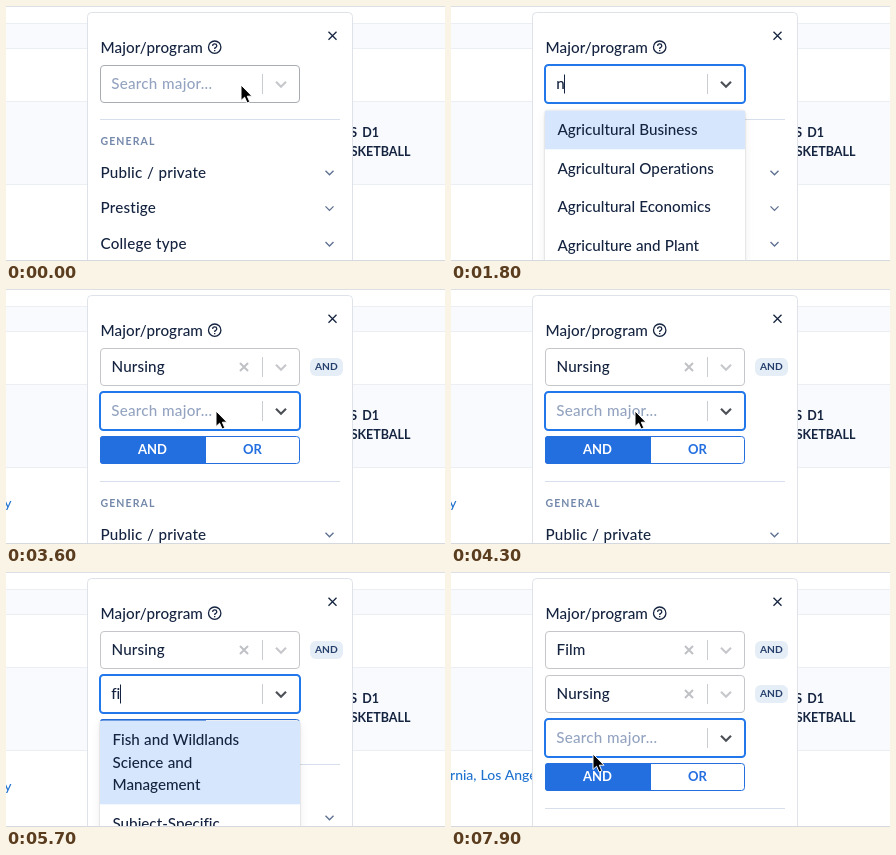
An HTML page that plays this animation: 439x255 px, repeating every 8000 ms.

```html
<!DOCTYPE html>
<html lang="en">
<head>
<meta charset="utf-8">
<title>Major search</title>
<style>
  html, body { margin: 0; width: 100%; height: 100%; overflow: hidden; background: #fff; }
  svg { display: block; width: 439px; height: 255px; }
  text { font: 500 15.2px Lato, sans-serif; font-variant-ligatures: none; word-spacing: .4px; fill: #14233f; white-space: pre; }
  .hint { fill: #93a3c0; letter-spacing: .25px; }
  .heading { font-size: 10.5px; font-weight: 700; letter-spacing: 1.1px; fill: #7388aa; }
  .sport { font-size: 12.5px; font-weight: 700; text-anchor: end; word-spacing: 2px; }
  .link { font-size: 14px; fill: #1f72d0; }
  .badge { font-size: 10.2px; font-weight: 700; text-anchor: middle; fill: #243f6b; }
  .button { font-size: 13px; font-weight: 700; text-anchor: middle; }
</style>
</head>
<body>
<svg id="stage" viewBox="0 0 439 255"></svg>
<script>
const LOOP = 8000, STEP = 100;
const BLUE = '#246fe0', FOCUS = '#2277ea', RULE = '#d8dfec';
const stage = document.getElementById('stage');

const agriculture = [['Agricultural Business'], ['Agricultural Operations'],
  ['Agricultural Economics'], ['Agriculture and Plant', 'Operations']];
const nursing = [['Nursing'], ['Nursing Science'], ['Nursing Practice'], ['Nursing Education']];
const fish = [['Fish and Wildlands', 'Science and', 'Management'], ['Subject-Specific', 'Education']];
const film = [['Film'], ['Film and Video'], ['Film Studies']];

// start time, typed text, options (null while the menu is closed)
const searches = [
  [0, '', null], [600, '', agriculture], [1700, 'n', agriculture], [2000, 'nu', nursing],
  [2100, 'nur', nursing], [3400, '', null], [4600, '', agriculture], [5500, 'f', fish],
  [5700, 'fi', fish], [5800, 'fil', film], [5900, 'film', film], [6600, '', null]
];
const caretOn = [[600, 1100], [1600, 2500], [3000, 3400], [5000, 6400]];
const pointerOn = [[0, 1700], [2700, 5500], [7600, LOOP]];
const pointerPath = [
  [0, 235, 79], [200, 209, 78], [2600, 209, 78], [3200, 210, 122], [4100, 210, 122],
  [4300, 184, 122], [7500, 184, 122], [7900, 142, 182], [LOOP, 142, 182]
];

const within = (t, spans) => spans.some(([from, to]) => t >= from && t < to);

function pointerAt(t) {
  const i = pointerPath.findIndex(p => p[0] > t);
  const [t0, x0, y0] = pointerPath[i - 1], [t1, x1, y1] = pointerPath[i];
  const k = (t - t0) / (t1 - t0), ease = k * k * (3 - 2 * k);
  return [x0 + (x1 - x0) * ease, y0 + (y1 - y0) * ease];
}

const text = (x, y, s, cls = '', extra = '') =>
  `<text x="${x}" y="${y}" class="${cls}" ${extra}>${s}</text>`;
const rect = (x, y, w, h, fill, extra = '') =>
  `<rect x="${x}" y="${y}" width="${w}" height="${h}" fill="${fill}" ${extra}/>`;
const path = (d, color, width = 1) =>
  `<path d="${d}" fill="none" stroke="${color}" stroke-width="${width}"/>`;
const cross = (x, y, r, color, width) =>
  path(`M${x - r} ${y - r}l${2 * r} ${2 * r}m0 ${-2 * r}l${-2 * r} ${2 * r}`, color, width);
const chevron = (x, y, r, color, width) =>
  path(`M${x - r} ${y - r / 2}l${r} ${r}l${r} ${-r}`, color, width);

function page(t) {
  const link = t < 3500 ? '' : t < 6600
    ? text(5.5, 219, 'University', 'link', 'text-anchor="end"')
    : text(-1, 207.5, 'rnia, Los Angeles', 'link');
  return rect(0, 0, 439, 255, '#fff') +
    rect(0, 17, 439, 26, '#f8fafd') + rect(0, 95, 439, 84, '#f8fafd') +
    path('M0 .5H439', '#dcdfe3') + path('M0 17.5H439M0 42.5H439M0 95.5H439M0 178.5H439', '#ebeff4') +
    text(373, 131, "MEN'S D1", 'sport') + text(404.5, 150, 'BASKETBALL', 'sport') + link;
}

function panel(shift) {
  const items = ['Public / private', 'Prestige', 'College type'].map((label, i) => {
    const y = 166.5 + 35.6 * i + shift;
    return text(94.5, y + 5, label, '', 'letter-spacing=".2"') +
      chevron(323.5, y + .3, 4, '#5c6f92', 1.3);
  });
  return rect(81.5, 6.5, 265, 260, '#fff', 'rx="4" stroke="#dfe3e9"') +
    cross(326.5, 29.8, 4, '#14233f', 1.3) +
    text(94.5, 46.5, 'Major/program', '', 'letter-spacing=".1"') +
    '<circle cx="208.7" cy="41.2" r="6.2" fill="none" stroke="#14233f" stroke-width="1.3"/>' +
    path('M206.6 39.9q.1-2 2.1-2t2.1 1.8q0 1.1-1.1 1.7-1 .5-1 1.5M208.7 43.9v1.3', '#14233f', 1.3) +
    path(`M94 ${113.5 + shift}H334`, RULE) +
    text(94.5, 139 + shift, 'GENERAL', 'heading') + items.join('');
}

function control(y, focused, hovered) {
  const border = focused ? FOCUS : hovered ? '#a9adb3' : '#c4c6c9';
  const frame = focused
    ? rect(94, y - 1, 200, 38, '#fff', `rx="3.5" stroke="${border}" stroke-width="2"`)
    : rect(94.5, y - .5, 199, 37, '#fff', `rx="3.5" stroke="${border}"`);
  return frame + path(`M256.5 ${y + 8}v20`, '#c9ccd1') +
    chevron(275, y + 18.2, 5, focused ? '#4d5157' : '#c6c8cc', 2.2);
}

const chosen = (y, label, hovered) => control(y, false, hovered) +
  text(105.5, y + 23, label, '', 'letter-spacing=".15"') + cross(238, y + 18, 4, '#bfc1c5', 2) +
  rect(304, y + 9, 33, 18, '#e5edf6', 'rx="6"') + text(320.3, y + 21.3, 'AND', 'badge');

const buttons = y =>
  rect(94.5, y + .5, 199, 27, '#fff', `rx="3" stroke="${BLUE}"`) +
  `<path d="M200 ${y}v28H97q-3 0-3-3v-22q0-3 3-3z" fill="${BLUE}"/>` +
  text(146.5, y + 18.3, 'AND', 'button', 'style="fill:#fff"') +
  text(246.5, y + 18.3, 'OR', 'button', `style="fill:${BLUE}"`);

function menu(top, options) {
  let y = top;
  const rows = options.map((lines, i) => {
    const height = 16 + 22.5 * lines.length;
    const row = (i ? '' : rect(94, y, 200, height, '#d6e6fd')) +
      lines.map((line, j) => text(106.5, y + 24.5 + 22.5 * j, line)).join('');
    y += height;
    return row;
  });
  return rect(94, top, 200, y - top, '#fff',
    'rx="3" style="filter:drop-shadow(0 0 1px #0003) drop-shadow(0 3px 4px #0001)"') + rows.join('');
}

const pointer = ([x, y]) => `<path transform="translate(${x} ${y})"
  d="M0 0V15.5L3.6 12.2 6.1 18 8.8 16.8 6.3 11.2H11Z" fill="#000" stroke="#fff"/>`;

function render(t) {
  const picks = t < 3400 ? [] : t < 6600 ? ['Nursing'] : ['Film', 'Nursing'];
  const n = picks.length, y = 60 + 44 * n;
  const [, typed, options] = searches.filter(s => s[0] <= t).pop();
  const mouse = pointerAt(t);
  const hovered = top => mouse[1] >= top && mouse[1] <= top + 37;

  stage.innerHTML = page(t) + panel(n ? 35 + 44 * n : 0) +
    picks.map((label, i) => chosen(60 + 44 * i, label, hovered(60 + 44 * i))).join('') +
    control(y, t >= 600, hovered(y)) +
    text(105.2, y + 23, typed || 'Search major...', typed ? '' : 'hint', 'id="query"') +
    (n ? buttons(y + 43) : '') +
    (options ? menu(y + 44.8, options) : '') +
    path('M0 254.5H439', '#d5d8dc');

  if (within(t, caretOn)) {
    const width = typed ? document.getElementById('query').getComputedTextLength() : 0;
    stage.insertAdjacentHTML('beforeend', path(`M${Math.floor(105 + width) + .5} ${y + 8.5}v19`, '#14233f'));
  }
  if (within(t, pointerOn)) stage.insertAdjacentHTML('beforeend', pointer(mouse));
}

let shown = -1;
function tick() {
  const t = Math.floor(performance.now() % LOOP / STEP) * STEP;
  if (t !== shown) render(shown = t);
  requestAnimationFrame(tick);
}
tick();
</script>
</body>
</html>
```
